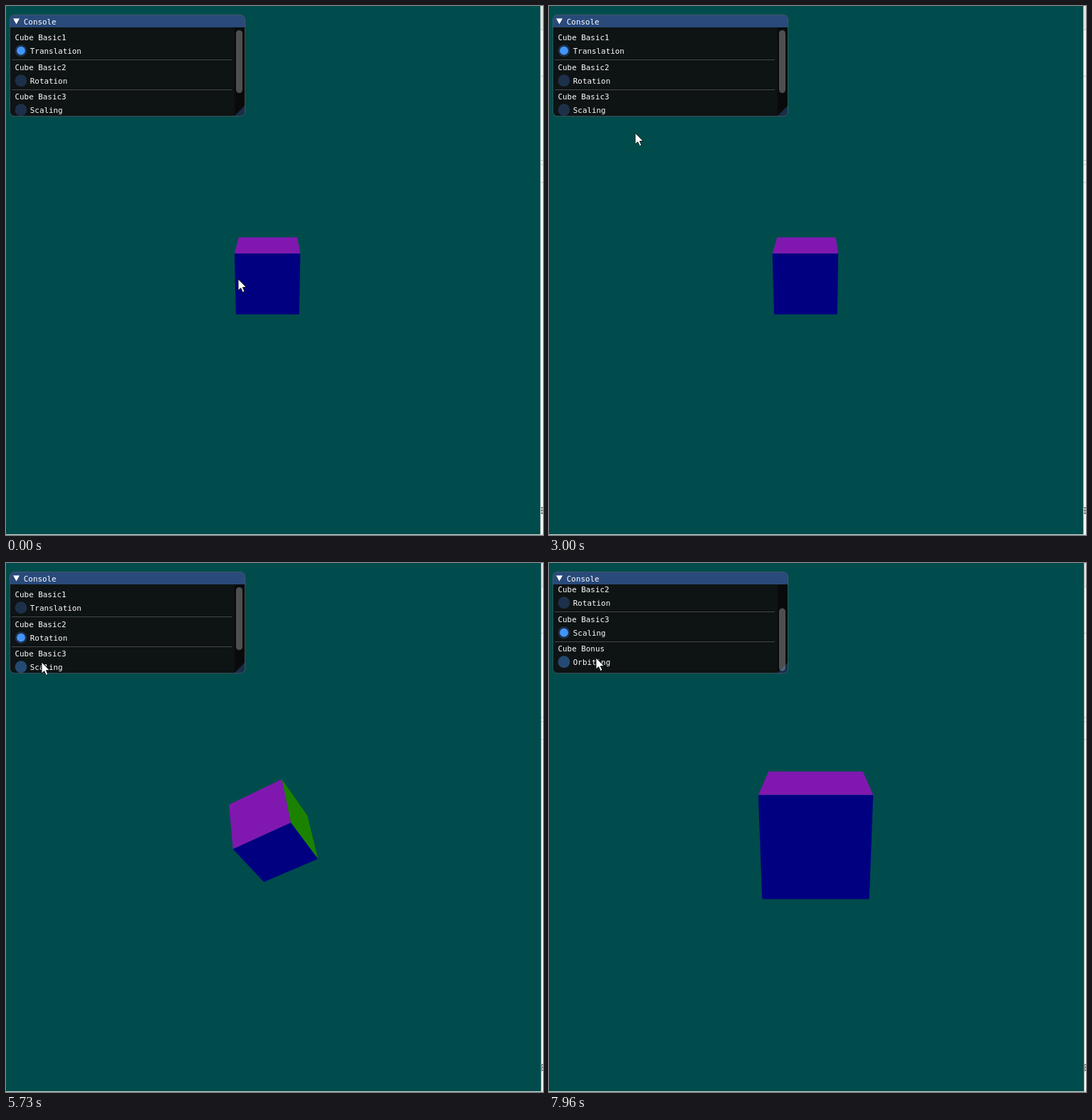
An HTML page with a canvas that plays this animation: 754 by 742 pixels, repeating every 8 s.

```html
<!DOCTYPE html>
<html lang="en">
<head>
<meta charset="utf-8">
<title>Cube console</title>
<style>
html, body { margin: 0; width: 100%; height: 100%; overflow: hidden; background: #004c4c; }
canvas { display: block; }
</style>
</head>
<body>
<canvas id="stage" width="754" height="742"></canvas>
<script>
const ctx = document.getElementById('stage').getContext('2d');
const LOOP = 8000;
const ROTATE_AT = 3700, SCALE_AT = 5950, SCROLL_AT = 6900;
const FONT = '10.88px "DejaVu Sans Mono", monospace';
const CHAR = 6.55, ROW = 41.5, SCROLL = 48.3;

// Camera: pitched down, looking at the middle of the scene
const CAM = { x: 374.5, y: 376.4, focal: 705, dist: 16.51, sin: 0.3162, cos: 0.9487 };
const COLORS = ['#1b8200', '#8018b0', '#000080']; // x, y and z faces

const ROWS = [
  ['Cube Basic1', 'Translation'], ['Cube Basic2', 'Rotation'],
  ['Cube Basic3', 'Scaling'], ['Cube Bonus', 'Orbiting']
];

// Pointer moves, one after another
const HOME = { x: 326, y: 383 };
const MOVES = [
  { from: 840, to: 1820, x: 358, y: 419 },
  { from: 2450, to: 3000, x: 121, y: 178 },
  { from: 3000, to: 3600, x: 52, y: 104 },
  { from: 3750, to: 4120, x: 124, y: 102 },
  { from: 5050, to: 5600, x: 50, y: 139 },
  { from: 6050, to: 6950, x: 160, y: 85 },
  { from: 7350, to: 7900, x: 66, y: 133 }
];

const clamp = v => Math.max(0, Math.min(1, v));
const ease = k => k * k * (3 - 2 * k);

function pointerAt(t) {
  return MOVES.reduce((p, m) => {
    const k = ease(clamp((t - m.from) / (m.to - m.from)));
    return { x: p.x + (m.x - p.x) * k, y: p.y + (m.y - p.y) * k };
  }, HOME);
}

// The three behaviours of the cube
function slide(t) {
  const reach = 44.5 / 46, period = 1848, peak = 540;
  const phase = (t - peak + period) / period % 1;
  return reach * (Math.abs(phase - 0.5) * 4 - 1);
}
const spin = t => 1.939 + 0.004953 * (t - 4710);
const swell = t => 1.01 + Math.cos((t - 7085) / 1000);

function path(points, fill, stroke) {
  ctx.beginPath();
  points.forEach(([x, y]) => ctx.lineTo(x, y));
  ctx.closePath();
  ctx.fillStyle = fill;
  ctx.fill();
  if (stroke) {
    ctx.strokeStyle = stroke;
    ctx.lineWidth = 1;
    ctx.stroke();
  }
}

function rect(x, y, w, h, color) {
  ctx.fillStyle = color;
  ctx.fillRect(x, y, w, h);
}

function round(x, y, w, h, r) {
  ctx.beginPath();
  ctx.roundRect(x, y, w, h, r);
}

function disc(x, y, r, color) {
  ctx.beginPath();
  ctx.arc(x, y, r, 0, Math.PI * 2);
  ctx.fillStyle = color;
  ctx.fill();
}

function label(text, x, y) {
  ctx.font = FONT;
  ctx.fillStyle = '#fff';
  ctx.fillText(text, x, y);
}

// Turn about the horizontal axis (1, 0, 1)
function turn([x, y, z], angle) {
  const h = Math.SQRT1_2, c = Math.cos(angle), s = Math.sin(angle);
  const n = (x + z) * h, e = (z - x) * h;
  const up = y * c - e * s, side = y * s + e * c;
  return [(n - side) * h, up, (n + side) * h];
}

function project([x, y, z]) {
  const up = y * CAM.cos - z * CAM.sin;
  const near = y * CAM.sin + z * CAM.cos;
  const k = CAM.focal / (CAM.dist - near);
  return [CAM.x + x * k, CAM.y - up * k];
}

function drawCube(t) {
  let shift = 0, angle = 0, size = 1;
  if (t < ROTATE_AT) shift = slide(t);
  else if (t < SCALE_AT) angle = spin(t);
  else size = swell(t);

  for (let axis = 0; axis < 3; axis++) {
    for (const side of [-1, 1]) {
      const corners = [0, 1, 2, 3].map(i => {
        const p = [];
        p[axis] = side;
        p[(axis + 1) % 3] = i === 1 || i === 2 ? side : -side;
        p[(axis + 2) % 3] = i < 2 ? -1 : 1;
        const [x, y, z] = turn(p, angle);
        return project([x * size + shift, y * size, z * size]);
      });
      const [a, b, c] = corners;
      const area = (b[0] - a[0]) * (c[1] - a[1]) - (b[1] - a[1]) * (c[0] - a[0]);
      if (area < 0) path(corners, COLORS[axis]);
    }
  }
}

function drawRow(i, y, active, pointer) {
  const [title, option] = ROWS[i];
  const mid = y + 62.7;
  const hover = pointer.x > 13 && pointer.x < 34 + option.length * CHAR &&
    Math.abs(pointer.y - mid) < 8.5 && pointer.y > 30 && pointer.y < 154;
  label(title, 12.5, y + 48);
  disc(21, mid, 8.4, hover ? '#244a73' : '#1d304a');
  if (active) disc(21, mid, 5.9, '#4296fa');
  label(option, 33.8, y + 67);
  if (i < ROWS.length - 1) rect(8, y + 75, 309, 1, '#44474c');
}

function drawConsole(t, pointer) {
  const scrolled = t >= SCROLL_AT;
  const active = t < ROTATE_AT ? 0 : t < SCALE_AT ? 1 : 2;

  ctx.save();
  round(5.5, 12.5, 330, 142, 6.5);
  ctx.clip();
  rect(5, 12, 331, 143, '#0e1313');
  rect(5, 12, 331, 18, '#294a7a');
  path([[10, 17.5], [19, 17.5], [14.5, 25.5]], '#fff');
  label('Console', 24.8, 25.5);

  ctx.save();
  ctx.beginPath();
  ctx.rect(6, 30, 315, 124);
  ctx.clip();
  ROWS.forEach((_, i) => {
    drawRow(i, Math.round(i * ROW - (scrolled ? SCROLL : 0)), i === active, pointer);
  });
  ctx.restore();

  rect(321, 30, 14, 125, '#090b0b');
  round(323, scrolled ? 63.5 : 34, 9, 88, 4.5);
  ctx.fillStyle = '#4f4f4f';
  ctx.fill();
  path([[336, 139], [336, 155], [320, 155]], 'rgba(66,150,250,0.25)');
  ctx.restore();

  round(5.5, 12.5, 330, 142, 6.5);
  ctx.strokeStyle = 'rgba(110,110,128,0.5)';
  ctx.lineWidth = 1;
  ctx.stroke();
}

// Sliver of the window behind, along the right and bottom edges
function drawEdges(t) {
  const x = t < ROTATE_AT ? 750 : 751;
  rect(x, 0, 1, 742, '#a9b5b5');
  rect(x + 1, 0, 4, 742, '#f6f6f6');
  rect(x + 1, 0, 4, 33, '#e4e4e4');
  for (const y of [33, 98, 216, 222, 247]) rect(x + 1, y, 4, 1, '#c4c4c4');
  for (let y = 703; y < 714; y += 4) rect(x + 1, y, 3, 1, '#555');
  rect(752, 704, 1, 9, '#777');
  rect(0, 741, 754, 1, '#d5dfdf');
}

function drawPointer({ x, y }) {
  const shape = [[0, 0], [0, 16], [3.7, 12.7], [6.3, 18.5], [9, 17.3], [6.4, 11.7], [11.3, 11.5]];
  path(shape.map(([a, b]) => [x + a, y + b]), '#fff', '#0b1a1a');
}

function draw(t) {
  const pointer = pointerAt(t);
  rect(0, 0, 754, 742, '#004c4c');
  drawCube(t);
  drawConsole(t, pointer);
  drawEdges(t);
  drawPointer(pointer);
}

const start = performance.now();
function tick() {
  draw((performance.now() - start) % LOOP);
  requestAnimationFrame(tick);
}
tick();
</script>
</body>
</html>
```
